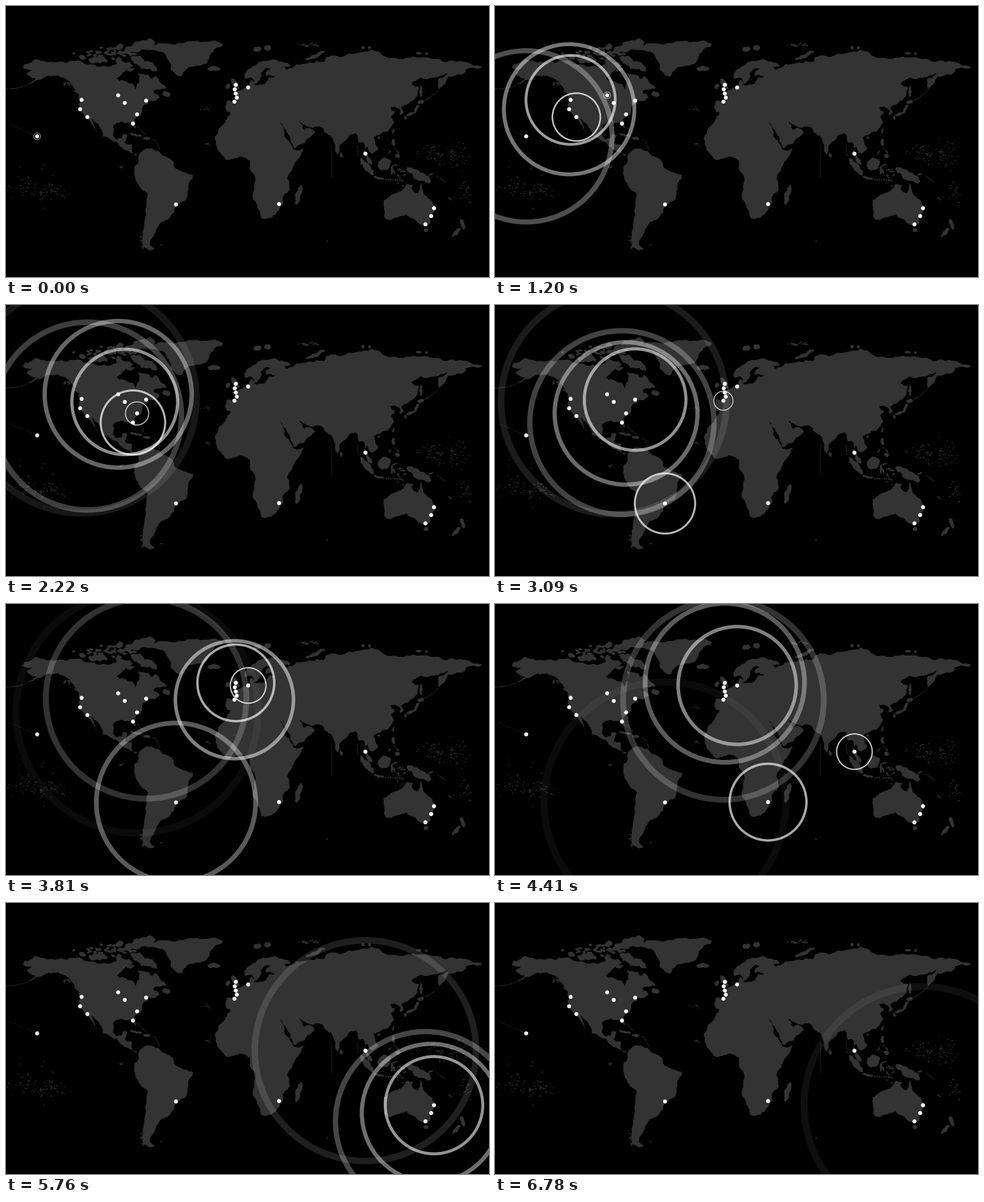
A matplotlib script that plays this animation: 720 by 405 pixels, repeating every 7.2 s.

```python
import numpy as np
import matplotlib.pyplot as plt
from matplotlib.animation import FuncAnimation
from matplotlib.collections import PolyCollection
from matplotlib.patches import Circle

W, H, DPI = 720, 405, 100
STEP, FRAMES, LAST = 30, 240, 226      # ms per frame, frames, frame that holds
GAP, LIFE = 300, 1800                  # ms between rings, ms a ring lives
LAND, SEA = "#333333", "black"

rng = np.random.default_rng(7)
outlines, fills = [], []


def project(lon, lat):
    return np.stack([346 + 1.910 * np.asarray(lon), 240.2 - 2.251 * np.asarray(lat)], -1)


def rugged(p, levels=3, amount=0.16):
    """Subdivide a closed outline along a soft curve, shifting each midpoint."""
    for _ in range(levels):
        nxt, far, prev = (np.roll(p, k, axis=0) for k in (-1, -2, 1))
        d = nxt - p
        size = np.hypot(*d.T)[:, None]
        side = np.c_[-d[:, 1], d[:, 0]] * np.minimum(1, 14 / (size + 1e-6))
        mid = (p + nxt) / 2 + (p + nxt - prev - far) / 32
        mid += side * rng.uniform(-amount, amount, (len(p), 1))
        p = np.stack([p, mid], 1).reshape(-1, 2)
    return p


def coast(*lonlat, fill=LAND):
    outlines.append(rugged(project(lonlat[0::2], lonlat[1::2])))
    fills.append(fill)


def isles(lon0, lat0, lon1, lat1, width, n=1, bend=0):
    """Lay n long islands end to end on an arc; width is in pixels."""
    s = np.linspace(0, 1, n + 1)
    ends = project(lon0 + (lon1 - lon0) * s, lat0 + (lat1 - lat0) * s + bend * np.sin(np.pi * s))
    turn = np.linspace(0, 2 * np.pi, 10, endpoint=False)[:, None]
    for a, b in zip(ends, ends[1:]):
        axis = (b - a) / 2 * (1 if n == 1 else rng.uniform(0.3, 0.9))
        across = np.array([-axis[1], axis[0]]) / np.hypot(*axis) * width / 2
        outlines.append(rugged((a + b) / 2 + np.cos(turn) * axis + np.sin(turn) * across, 2, 0.25))
        fills.append(LAND)


def scatter(lon, lat, dlon, dlat, n, size=1.2):
    """Drop n islets around a place."""
    for x, y in zip(rng.normal(lon, dlon, n), rng.normal(lat, dlat, n)):
        r = size * rng.uniform(0.3, 0.7)
        isles(x - r, y, x + r, y + rng.uniform(-r, r), size)


# Continents
coast(-168, 65.6, -166, 68.4, -156.6, 71.3, -135, 69, -128, 70.3, -115, 68, -95, 68,
      -95, 71.5, -85, 69.5, -82, 67, -87, 64.5, -94.5, 59, -92.5, 57, -82.3, 55,
      -80, 51.3, -79, 54.5, -77, 56.5, -78, 62.4, -70, 61, -68, 58.5, -64.5, 60.3,
      -60, 55, -56, 52, -66, 50, -65, 48.5, -61, 46, -66, 43.6, -70, 43.7, -70, 41.7,
      -74, 40.6, -75.6, 35.2, -81, 31.5, -80.2, 25.4, -83, 29.5, -89.5, 29.3, -97, 28,
      -97.7, 21, -95, 18.4, -91, 18.7, -90.4, 21, -87, 21.4, -88.5, 15.9, -83.3, 15,
      -82.5, 9.3, -77.4, 8.6, -80, 7.3, -85.8, 10.5, -94, 16, -105.5, 20, -105.5, 22.5,
      -113, 31, -114.8, 31.7, -109.5, 23.2, -112.2, 25.5, -117.3, 33, -120.6, 34.5,
      -124.4, 41, -124.5, 48.3, -130.5, 54.8, -139, 59.7, -148, 60.5, -152, 59,
      -164, 54.7, -158, 58.7, -165, 61.5, -161, 64.6)
coast(-77.4, 8, -72, 12, -62, 10.5, -51.5, 4.3, -49, -1, -35.2, -5.5, -39, -13,
      -40.5, -21.5, -48.5, -26, -53.5, -34, -57.5, -36, -62, -39, -65.5, -45, -69, -51,
      -65.2, -54.8, -69, -55.6, -74.5, -52, -73.5, -40, -70.4, -18.4, -76.2, -14,
      -81.2, -5, -80, 1, -77.5, 4)
coast(-73, 78.3, -58, 75.5, -54, 70, -52, 64, -44, 60, -40, 65, -24, 69.5, -19, 77,
      -12, 81.5, -32, 83.6, -60, 82)
coast(-6, 36, -9.7, 31, -17, 21, -17.5, 14.7, -13, 8.5, -8, 4.4, 4, 6.3, 9.5, 4, 9, -1,
      13.5, -9, 11.8, -17, 15, -27, 18.4, -34.2, 25.7, -34, 32.5, -28, 35.5, -24, 35, -20,
      40.5, -15, 39, -6, 43, 0, 51.3, 11.8, 43.3, 11.5, 37.3, 19, 32.6, 29.8,
      35, 36, 30, 45, 10, 48, -5, 42)
coast(32.6, 29.8, 34.6, 28, 39, 21.5, 43.4, 12.7, 52, 15.6, 59.8, 22.5, 56.2, 25.5,
      51.5, 24.3, 48, 30, 52, 27.8, 57, 26, 66.5, 25.2, 70.5, 20.8, 72.7, 20, 77.5, 8.1,
      80.2, 15, 87, 21, 92, 22, 94.3, 16, 98, 16, 98.3, 8.5, 104.2, 1.3, 99.5, 9.5,
      100.5, 13.4, 105, 8.8, 109.3, 12, 105.8, 19.5, 110, 21, 117, 23.5, 121.8, 29.5,
      119.5, 35, 110, 52, 40, 52, 30, 40)
coast(119.3, 34, 122, 37, 118, 38.7, 122, 40, 126.5, 37.5, 126.5, 34.5, 129.3, 36,
      127.5, 39.7, 135, 43.5, 140, 48, 141, 53, 135.5, 54.7, 143, 59.2, 155, 59.5,
      163.5, 62.3, 156, 57.5, 156.7, 51, 162, 56, 164, 60, 177, 62.5, 178, 64.7,
      190.3, 66, 180, 69, 160, 69.7, 140, 72.5, 129, 71.5, 113, 73.8, 104, 77.7, 81, 73,
      69, 72.8, 67, 69.5, 60, 69.5, 60, 45, 105, 34)
coast(62, 69.3, 46, 68, 43, 66, 38, 64.5, 35, 66.6, 41, 67, 26, 71, 14, 67.5, 5.5, 62,
      6, 58.2, 10.5, 59.2, 12.5, 56, 10.3, 57.6, 8.5, 54, 3, 51.3, -4.7, 48.4, -1.2, 46,
      -1.7, 43.4, -9, 43.4, -8.9, 37.2, -6, 36, 40, 36, 65, 45)
coast(12, 54.5, 14.5, 55.5, 17, 57.5, 17.5, 62, 22, 65.5, 25, 65, 21.5, 62.5, 22, 60.3,
      29, 60.2, 24, 59.2, 23, 57.3, 19, 54.4, fill=SEA)
coast(114, -22, 122, -18, 129, -15, 131.5, -11.5, 136.5, -12.2, 135.5, -15, 140.5, -17.5,
      142.4, -10.8, 146.2, -19, 153.3, -26, 150, -37.4, 143.5, -38.7, 138, -35,
      131.5, -31.6, 124, -33.5, 115.2, -34.5, 113.5, -26)

# Arctic
isles(-84, 73, -63, 64, 13)
isles(-89, 77, -64, 83, 16)
isles(-117, 71, -102, 70.5, 10)
isles(-124, 73.5, -119, 71.7, 7)
isles(-95, 75.5, -80, 75.2, 5)
isles(-95, 78, -90, 81, 9)
isles(-87, 64, -81, 65, 5)
isles(53, 71, 68, 76.7, 6, bend=1)
isles(11, 77.5, 27, 79.5, 8, n=2)
isles(95, 79, 105, 79, 5, n=2)
isles(138, 75.5, 150, 75, 4, n=2)
scatter(-103, 75.5, 9, 2, 34, 3.2)
scatter(55, 80.6, 5, 0.5, 20, 1.6)
# Atlantic and Caribbean
isles(-59, 49, -53, 47.5, 8)
isles(-128, 50.7, -123.5, 48.5, 3)
isles(-84.7, 22, -74.5, 20.2, 3)
isles(-74.3, 19, -68.5, 18.6, 4)
isles(-67, 18.3, -61, 11, 1.5, n=10, bend=2)
isles(-78.5, 26.8, -72, 21, 1.5, n=8)
isles(-24, 65, -13.8, 65, 7)
isles(0.5, 51.3, -5, 58.5, 8)
isles(-9, 51.8, -7, 55, 6)
isles(-61, -51.8, -58, -51.8, 2, n=2)
# East Asia and the Philippines
isles(142.5, 54, 143, 46.2, 3.5)
isles(140, 42.5, 145, 43.5, 6)
isles(131, 34, 138, 36, 4.5)
isles(137, 35.5, 141.3, 41.2, 5)
isles(130, 33.7, 131, 31.3, 4)
isles(144, 43.5, 156.5, 50.8, 1.8, n=10, bend=-0.8)
isles(121.6, 25.2, 120.6, 22, 3)
isles(108.7, 19, 110.8, 19.6, 3.5)
isles(80, 9.4, 81, 6, 4)
isles(121, 18.5, 121.5, 13.8, 5)
isles(121.5, 13, 125.5, 9, 3, n=5)
isles(122.5, 7.5, 126.3, 7, 6)
isles(117.3, 8.5, 119.3, 11, 1.5)
# Malay archipelago and the south
isles(95.3, 5.6, 105.8, -5.8, 8)
isles(105.3, -6.6, 114.4, -8.2, 3.2)
isles(114.6, -8.5, 127, -8.8, 2.4, n=7)
isles(110, -1.5, 118, 5, 17)
isles(120, -5.3, 120.2, 0.7, 3.5)
isles(120, 0.7, 125, 1.4, 2)
isles(121, -1.5, 122.5, -5, 3)
isles(126, -3.3, 130.7, -3.3, 2.4, n=2)
isles(131.5, -1, 150.5, -10.2, 13)
isles(148.5, -5.8, 152.3, -4.4, 2.4)
isles(155, -6, 162, -10.5, 2, n=6)
isles(164, -20.2, 167, -22.3, 1.8)
isles(146.5, -40.7, 146.8, -43.5, 7)
isles(173.5, -34.8, 176.5, -41.5, 6)
isles(173.5, -40.8, 167, -46.5, 6)
isles(49.5, -12.3, 45, -25.5, 8)
isles(68.8, -49.3, 70.3, -49.5, 1.8)
# Long thin chains
isles(-181, 51.6, -164, 54.4, 1.6, n=16, bend=-0.8)
isles(-178, 28, -155.5, 19.5, 0.8, n=14)
isles(73, 14, 73, -7, 1, n=18)
isles(92.8, 14, 93.8, 7, 1.3, n=6)
# Open-ocean islets
scatter(-165, -12, 9, 7, 40)
scatter(-147, -17, 6, 3, 45)
scatter(155, 8, 9, 3, 40)
scatter(171, 6, 5, 5, 35)
scatter(178, -17.5, 3, 3, 18, 1.4)
scatter(127, -4, 3, 3, 20, 1.6)
scatter(-26, 38.5, 2, 0.6, 7)
scatter(-24, 15.6, 0.8, 0.9, 7)
scatter(-91, -0.5, 0.7, 0.6, 5, 1.6)
scatter(-133, 56, 2, 1.5, 12, 1.6)
scatter(-74.5, -49, 0.8, 3, 18, 1.6)

# Cities in the order their rings start
cities = [(46.5, 194.8), (110.5, 154.3), (112.7, 140.3), (121.3, 166), (167.2, 133.5),
          (177, 144.8), (189.2, 175.7), (195.4, 162), (208.9, 141.4), (253.4, 296.6),
          (340.5, 143), (342.6, 117.8), (361, 121.8), (407, 296), (535.8, 220.7),
          (625.3, 326.3), (633.8, 313.9), (638, 302.2)]
quiet = [(341, 124.5), (342.6, 130.8), (344, 137)]

fig = plt.figure(figsize=(W / DPI, H / DPI), dpi=DPI, facecolor="black")
ax = fig.add_axes([0, 0, 1, 1])
ax.set(xlim=(0, W), ylim=(H, 0))
ax.axis("off")
ax.add_collection(PolyCollection(outlines, facecolors=fills, edgecolor="none"))

rings = [ax.add_patch(Circle(c, 5, fill=False, ec="white", visible=False, zorder=3))
         for c in cities]
for c in cities + quiet:
    ax.add_patch(Circle(c, 3, fc="white", ec="none", zorder=4))


def draw(i):
    now = min(i, LAST) * STEP
    for k, ring in enumerate(rings):
        s = (now - k * GAP) / LIFE
        ring.set_visible(0 <= s < 1)
        if 0 <= s < 1:
            ring.set_radius(5 + 184.5 * s)
            ring.set_linewidth((0.6 + 10.4 * s) * 72 / DPI)
            ring.set_alpha(0.93 * (1 - s))
    return rings


anim = FuncAnimation(fig, draw, frames=FRAMES, interval=STEP, repeat=True,
                     repeat_delay=0, init_func=lambda: draw(0))
plt.show()
```
